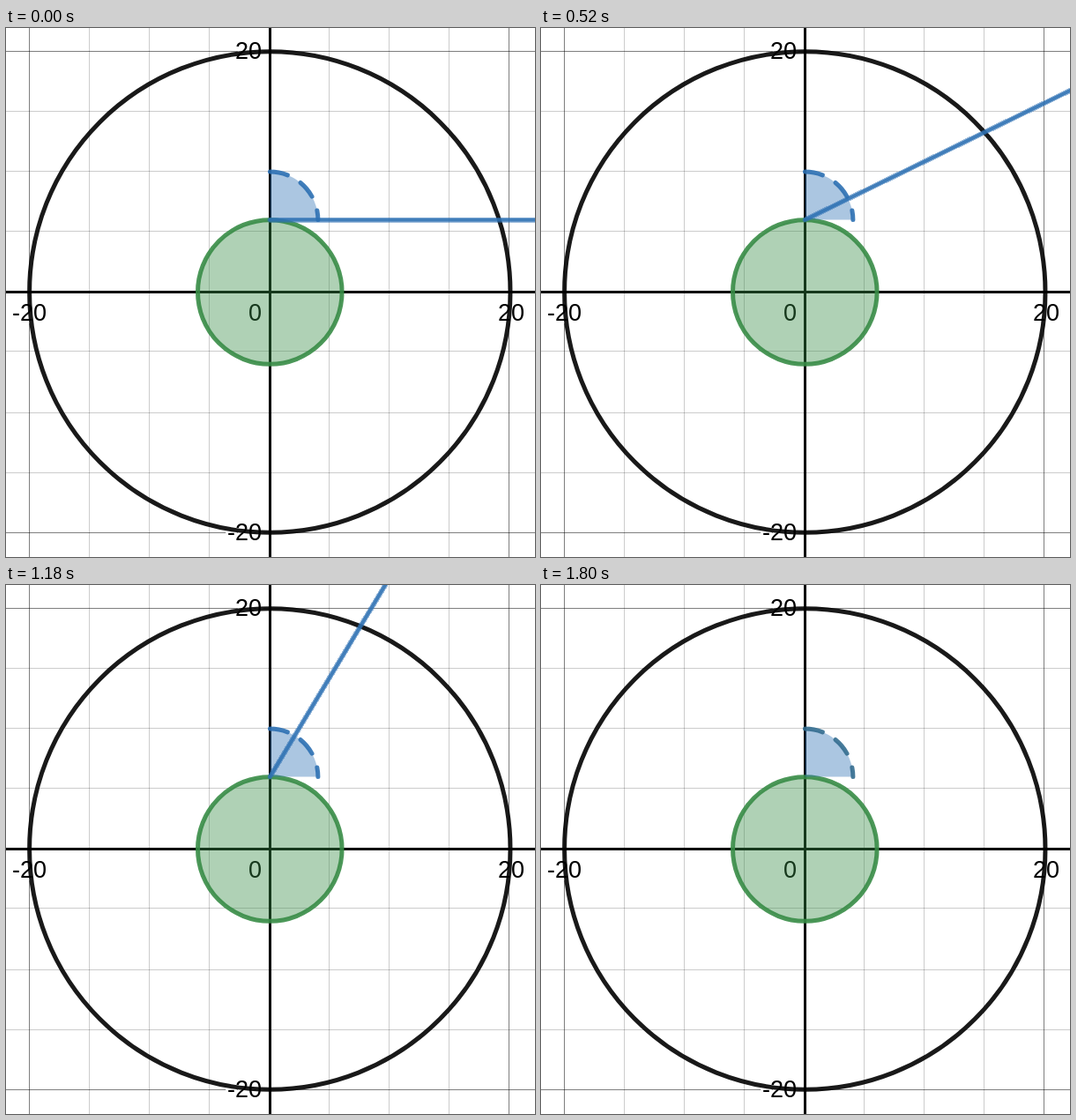
These frames come from a looping animation (600 by 600 pixels, 1820 ms). An HTML page:

```html
<!DOCTYPE html>
<html lang="en">
<head>
<meta charset="utf-8">
<title>Rotating ray</title>
<style>
  html, body { margin: 0; width: 100%; height: 100%; overflow: hidden; background: #fff; }
  svg { display: block; width: 600px; height: 600px; }
  .minor { stroke: rgba(0, 0, 0, .2); }
  .major { stroke: rgba(0, 0, 0, .5); }
  .axis { stroke: #000; stroke-width: 3; }
  .labels {
    font: 27px "Liberation Sans", Arial, sans-serif;
    stroke: #fff; stroke-width: 6; stroke-linejoin: round; paint-order: stroke;
  }
  .curve { fill: none; stroke-width: 5; stroke-opacity: .9; stroke-linecap: round; }
  .outer { stroke: #000; }
  .inner { stroke: #388c46; fill: #388c46; fill-opacity: .4; }
  .sector { fill: #2d70b3; fill-opacity: .4; }
  .arc { stroke: #2d70b3; stroke-dasharray: 20.4 17; animation: mute 1820ms -1ms step-end infinite; }
  .ray {
    stroke: #2d70b3;
    animation: turn 1820ms -1ms steps(91, end) infinite, vanish 1820ms -1ms step-end infinite;
  }
  /* one degree every 20 ms; a vertical ray has no slope, so it is not drawn */
  @keyframes turn { from { transform: rotate(0deg); } to { transform: rotate(-91deg); } }
  @keyframes vanish { 0% { visibility: visible; } 98.9%, 100% { visibility: hidden; } }
  @keyframes mute { 0% { stroke: #2d70b3; } 98.9%, 100% { stroke: #336d90; } }
</style>
</head>
<body>
<svg viewBox="0 0 600 600">
  <path class="minor" d="M94.5 0V600M162.5 0V600M230.5 0V600M366.5 0V600M434.5 0V600M502.5 0V600
    M0 94.5H600M0 162.5H600M0 230.5H600M0 366.5H600M0 436.5H600M0 504.5H600"/>
  <path class="major" d="M26.5 0V600M570.5 0V600M0 26.5H600M0 572.5H600"/>
  <path class="axis" d="M299.5 0V600M0 299.5H600"/>
  <g class="labels">
    <g text-anchor="end">
      <text x="290" y="35">20</text>
      <text x="290" y="581">-20</text>
      <text x="290" y="332">0</text>
    </g>
    <g text-anchor="middle">
      <text x="26.5" y="332">-20</text>
      <text x="573" y="332">20</text>
    </g>
  </g>
  <circle class="curve outer" cx="299.3" cy="299.5" r="272.7"/>
  <circle class="curve inner" cx="299.3" cy="299.5" r="81.8"/>
  <g transform="translate(299.4 217.6)">
    <path class="sector" d="M0 0V-54.5A54.5 54.5 0 0 1 54.5 0Z"/>
    <path class="curve arc" d="M0 -54.5A54.5 54.5 0 0 1 54.5 0"/>
    <path class="curve ray" d="M0 0H1000"/>
  </g>
</svg>
</body>
</html>
```
